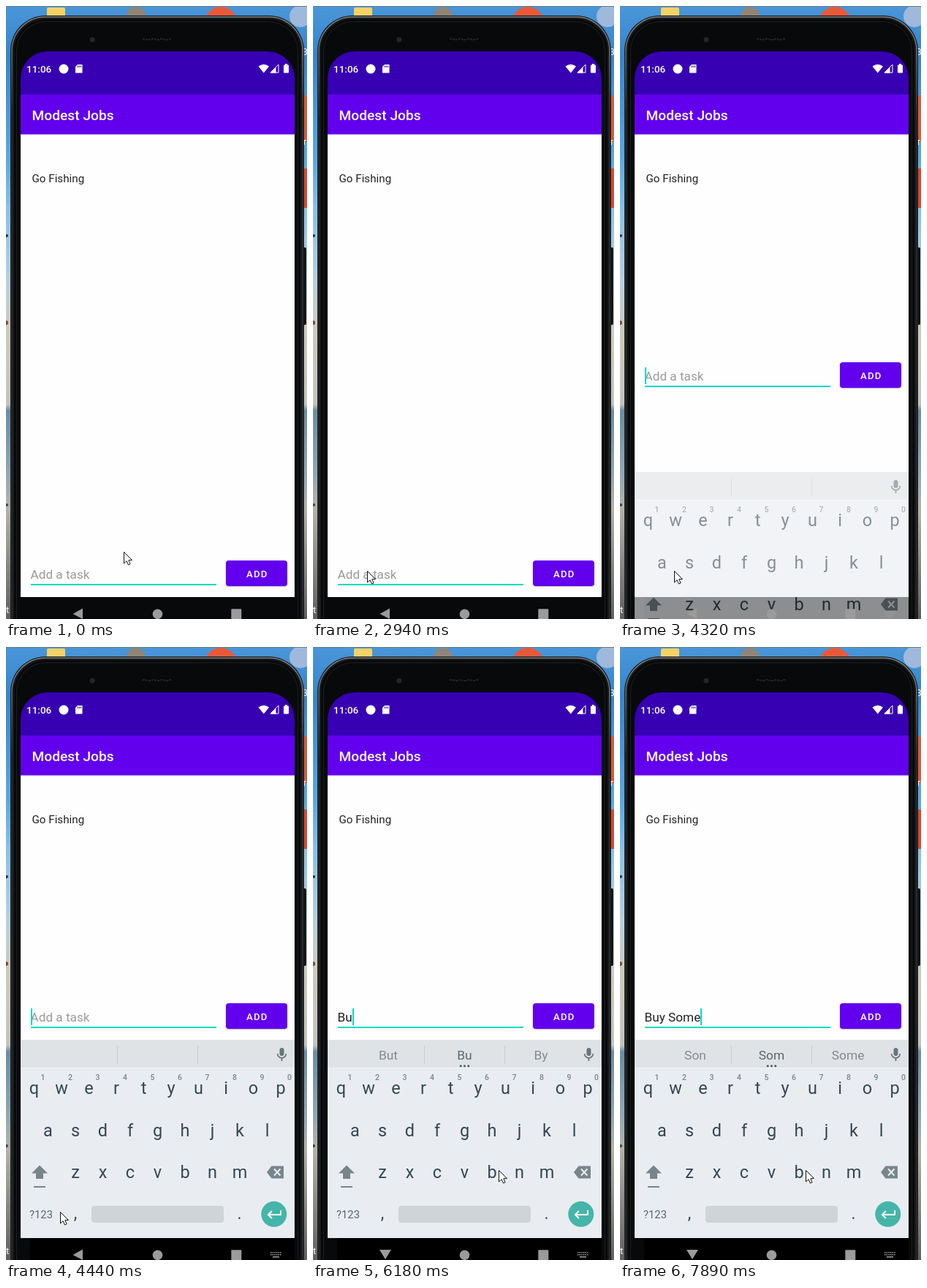
Write an HTML page with a canvas that moves like this. It is 412 px wide and 838 px high and loops after 8000 ms.

```html
<!DOCTYPE html>
<html lang="en">
<head>
<meta charset="utf-8">
<title>Task list</title>
<style>
html, body { margin: 0; width: 100%; height: 100%; overflow: hidden; background: #000; }
canvas { display: block; width: 412px; height: 838px; }
</style>
</head>
<body>
<canvas id="stage"></canvas>
<script>
const W = 412, H = 838, LOOP = 8000;
const TEAL = '#03dac5', PURPLE = '#6200ee', INK = '#37474f', GREY = '#78858b';
const dpr = window.devicePixelRatio || 1;

function layer(canvas) {
  canvas.width = W * dpr;
  canvas.height = H * dpr;
  const c = canvas.getContext('2d');
  c.scale(dpr, dpr);
  return c;
}

let g;
const screen = layer(document.getElementById('stage'));
const backCanvas = document.createElement('canvas');
const keysCanvas = document.createElement('canvas');

function box(x, y, w, h, color, r = 0) {
  g.fillStyle = color;
  g.beginPath();
  g.roundRect(x, y, w, h, r);
  g.fill();
}

function frame(x, y, w, h, color, r, width) {
  g.strokeStyle = color;
  g.lineWidth = width;
  g.beginPath();
  g.roundRect(x, y, w, h, r);
  g.stroke();
}

function disc(x, y, r, color) {
  g.fillStyle = color;
  g.beginPath();
  g.arc(x, y, r, 0, 7);
  g.fill();
}

function poly(color, ...pts) {
  g.fillStyle = color;
  g.beginPath();
  for (let i = 0; i < pts.length; i += 2) g.lineTo(pts[i], pts[i + 1]);
  g.closePath();
  g.fill();
}

function line(color, width, ...pts) {
  g.strokeStyle = color;
  g.lineWidth = width;
  g.beginPath();
  for (let i = 0; i < pts.length; i += 2) g.lineTo(pts[i], pts[i + 1]);
  g.stroke();
}

function text(s, x, y, size, color, align = 'left', weight = 400, spacing = 0) {
  g.font = `${weight} ${size}px Roboto, sans-serif`;
  g.letterSpacing = spacing + 'px';
  g.textAlign = align;
  g.fillStyle = color;
  g.fillText(s, x, y);
}

function fade(y0, y1, stops) {
  const f = g.createLinearGradient(0, y0, 0, y1);
  stops.forEach(([p, c]) => f.addColorStop(p, c));
  return f;
}

function drawDesktop() {
  box(0, 0, W, H, fade(0, H, [[0, '#4a96d8'], [.08, '#3585cf'], [.25, '#5aa8e2'], [.33, '#86c1e8'],
    [.45, '#b8d0dd'], [.53, '#cdc9bd'], [.65, '#c3c3bd'], [.66, '#6a8da4'], [.77, '#93a9b3'],
    [.82, '#b4b2a8'], [1, '#5f5f60']]));
  box(56, 2, 25, 14, '#f4d267', 2);
  disc(178, 14, 13, '#8f8578');
  disc(294, 23, 22, '#e8593a');
  disc(403, 14, 15, '#9eb9dc');
  box(0, 0, W, 1, '#6f7d88');
  box(406, 122, 6, 64, '#d65a3c');
  box(406, 222, 6, 54, '#d9482f');
  disc(0, 433, 3, '#7a4a28');
  disc(1, 314, 2, '#26333c');
  disc(1, 682, 2, '#39444a');
  text('t', 0, 830, 13, '#fff');
  text('3', 406, 67, 12, '#fff');
  text('r', 407, 190, 12, '#fff');
}

function drawPhone() {
  box(405, 330, 6, 106, '#111314', 2);
  box(6, 13, 402, 900, '#17191a', 48);
  frame(8, 15, 398, 900, fade(13, 150, [[0, '#7d8183'], [.4, '#6a6e70'], [1, '#2b2e30']]), 46, 1.5);
  box(11, 18, 392, 900, '#08090a', 43);
  frame(14.5, 21.5, 385, 900, '#1d1f21', 40, 1);
  disc(118, 46, 3.5, '#242628');
  for (let i = 0; i < 10; i++) box(187 + i * 4, 44 + (i % 3) * .5, 3, 2, '#222426');
}

function drawStatusBar() {
  text('11:06', 28, 91, 13.5, '#fff', 'left', 500);
  disc(79, 86, 6.5, '#fff');
  poly('#fff', 98, 80, 104.5, 80, 104.5, 91.5, 95, 91.5, 95, 83);
  for (let i = 0; i < 3; i++) box(98 + i * 2, 81.5, 1, 2.5, '#3700b3');
  g.fillStyle = '#fff';
  g.beginPath();
  g.moveTo(352.8, 91.5);
  g.lineTo(345.5, 82.5);
  g.quadraticCurveTo(352.8, 77, 360, 82.5);
  g.fill();
  line('#fff', 1, 362, 91, 373, 91, 373, 80, 362, 91);
  poly('#fff', 361.5, 91.5, 369.5, 83.5, 369.5, 91.5);
  box(380, 80.5, 7, 11, '#fff', 1);
  box(382, 79, 3, 2, '#fff');
}

function drawApp() {
  g.save();
  g.beginPath();
  g.roundRect(20, 62, 375, 776, [37, 37, 0, 0]);
  g.clip();
  box(20, 62, 375, 59.4, '#3700b3');
  box(20, 175, 375, 633, '#fefefe');
  box(20, 121, 375, 54.4, PURPLE);
  g.restore();
  drawStatusBar();
  text('Modest Jobs', 35.5, 156, 19.2, '#fff', 'left', 500);
  text('Go Fishing', 35.5, 241, 15.2, '#212121');
}

function drawKeys() {
  box(20, 537, 375, 271, '#e9edf1');
  box(20, 537, 375, 38, '#dfe3e6');
  box(20, 575, 375, 1, '#f1f4f6');
  box(152, 545, 1, 25, '#c9ced2');
  box(262, 545, 1, 25, '#c9ced2');

  box(374.5, 548, 6, 11, '#69757b', 3);
  g.strokeStyle = '#69757b';
  g.lineWidth = 1.7;
  g.beginPath();
  g.arc(377.5, 556, 5.8, 0, Math.PI);
  g.stroke();
  box(376.6, 562, 1.8, 4, '#69757b');

  [['qwertyuiop', 38.5, 611], ['asdfghjkl', 57.5, 669], ['zxcvbnm', 95, 726]].forEach(([row, x, y]) =>
    [...row].forEach((ch, i) => text(ch, x + i * 37.5, y, 23.5, INK, 'center')));
  [...'1234567890'].forEach((d, i) => text(d, 50.5 + i * 37.5, 592, 10.5, GREY, 'center', 500));

  poly(GREY, 46, 708.5, 57, 719.5, 51, 719.5, 51, 727, 41, 727, 41, 719.5, 35, 719.5);
  box(38, 737, 16, 2, GREY);
  poly(GREY, 357, 718, 363.5, 709.5, 380, 709.5, 380, 726.5, 363.5, 726.5);
  line('#e9edf1', 2, 367, 713.5, 375.5, 722.5);
  line('#e9edf1', 2, 375.5, 713.5, 367, 722.5);

  text('?123', 32, 781, 14.8, '#58666d');
  text(',', 95, 782, 23, INK, 'center');
  text('.', 319.5, 782, 23, INK, 'center');
  box(117, 764, 181, 23, '#cfd4d7', 4);
  disc(366.8, 775.3, 17.5, '#45b5a9');
  line('#fff', 2, 376, 770, 376, 776, 359.5, 776);
  line('#fff', 2, 364, 771, 359, 776, 364, 781);
}

function drawNav(keyIcon, down) {
  const c = '#9b9b9b';
  if (down) poly(c, 91, 824, 107, 824, 99, 837);
  else poly(c, 91.5, 831, 105, 823.5, 105, 838);
  disc(207.5, 831.3, 6.8, c);
  box(308.3, 824.3, 14, 14, c, 1);
  if (!keyIcon) return;
  for (let r = 0; r < 2; r++)
    for (let i = 0; i < 6; i++) box(362 + i * 2.6, 827 + r * 3, 1.6, 1.6, c);
  box(365, 833, 9, 1.6, c);
}

function drawInput(y, typed, caret) {
  g.save();
  g.shadowColor = 'rgba(0,0,0,.25)';
  g.shadowBlur = 2 * dpr;
  g.shadowOffsetY = dpr;
  box(301, y - 7, 84, 35, PURPLE, 4);
  g.restore();
  text('ADD', 329, y + 16, 13.2, '#fff', 'left', 500, 1.2);
  box(34, y + 25, 254, 2, TEAL);
  text(typed || 'Add a task', 33.5, y + 18, 17.2, typed ? '#212121' : '#9a9a9a');
  if (caret) box(Math.round(33.5 + g.measureText(typed).width), y, 2, 23, TEAL);
}

function drawHints(words) {
  if (!words) return;
  words.split(' ').forEach((word, i) =>
    text(word, 103 + i * 104.5, 564, 17.4, i === 1 ? '#5b686e' : '#818c91', 'center'));
  for (let i = -1; i < 2; i++) disc(207.5 + i * 5.3, 572.7, 1.5, '#4c595f');
}

function drawMouse(x, y) {
  g.save();
  g.translate(x + .5, y + .5);
  g.beginPath();
  [0, 0, 0, 15.5, 3.6, 12.2, 6, 17.5, 8.6, 16.3, 6.3, 11.2, 11, 11].forEach((v, i, p) => {
    if (i % 2) g.lineTo(p[i - 1], v);
  });
  g.closePath();
  g.fillStyle = '#fff';
  g.fill();
  g.strokeStyle = '#111';
  g.lineWidth = 1;
  g.stroke();
  g.restore();
}

// Each track holds [start, value] steps; the last one begun applies.
const at = (track, t) => track.filter(s => s[0] <= t).pop()[1];

const caretFlips = [350, 870, 1340, 1910, 2360, 2820, 4320, 4860, 5360, 6890, 7350];
const mouse = [[0, [161, 746]], [2060, [110, 770]], [2210, [84, 772]], [2360, [74, 772]],
  [4580, [175, 734]], [4860, [254, 715]]];
const typing = [[0, ''], [5510, 'B'], [6060, 'Bu'], [6300, 'Buy'], [6450, 'Buy '],
  [7350, 'Buy S'], [7770, 'Buy Som'], [7890, 'Buy Some']];
const hints = [[0, ''], [5630, 'By B But'], [6180, 'But Bu By'], [6300, 'But Buy By'], [6600, ''],
  [7470, 'Is S So'], [7620, 'So S See'], [7770, 'Son So Some'], [7890, 'Son Som Some']];

function draw(t) {
  g = screen;
  g.drawImage(backCanvas, 0, 0, W, H);
  const open = t >= 4320, rising = open && t < 4440;
  const focused = t >= 4070;
  const caret = caretFlips.filter(f => f <= t).length % 2 === 1;
  if (focused) box(33, 808, 362, 30, '#000');
  drawInput(open ? 494 : 765, at(typing, t), caret);
  if (open) {
    g.save();
    g.globalAlpha = rising ? .6 : 1;
    g.drawImage(keysCanvas, 0, rising ? 100 : 0, W, H);
    g.restore();
    drawHints(at(hints, t));
  }
  drawNav(focused, t >= 4710);
  drawMouse(...at(mouse, t));
}

g = layer(backCanvas);
drawDesktop();
drawPhone();
drawApp();
g = layer(keysCanvas);
drawKeys();

const start = performance.now();
function tick() {
  draw((performance.now() - start) % LOOP);
  requestAnimationFrame(tick);
}
tick();
</script>
</body>
</html>
```
